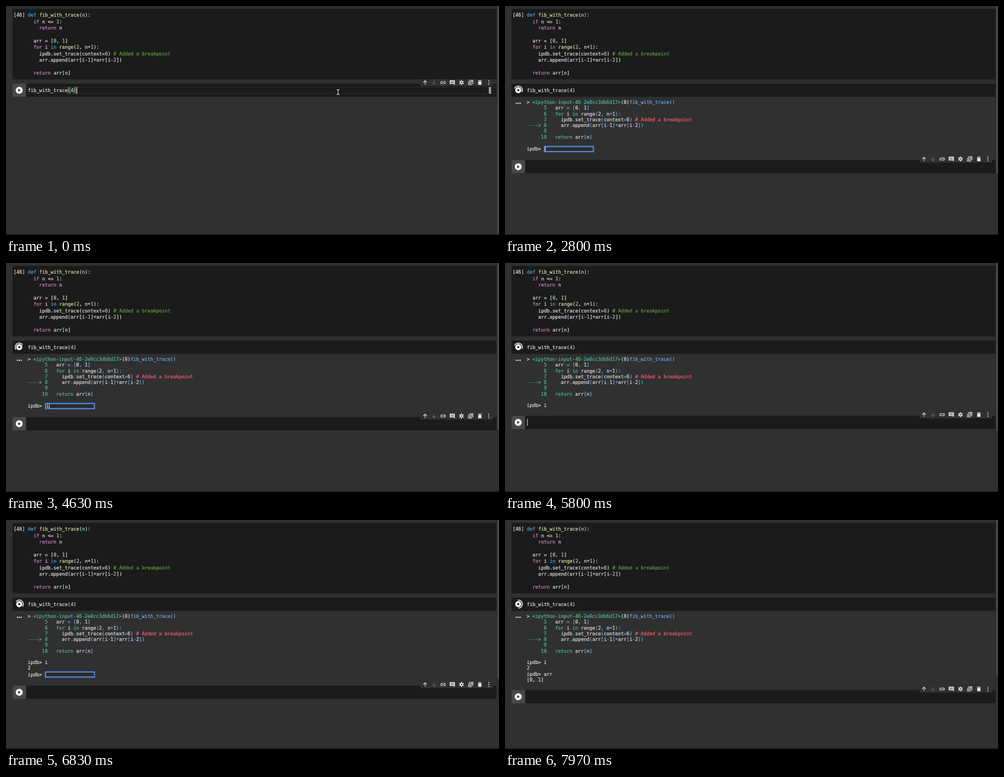
An HTML page with a canvas that plays this animation: 873 px wide and 407 px high, repeating every 8 s.

```html
<!DOCTYPE html>
<html lang="en">
<head>
<meta charset="utf-8">
<title>Notebook debugging</title>
<style>
  html, body { margin: 0; width: 100%; height: 100%; overflow: hidden; background: #303030; }
  canvas { display: block; }
</style>
</head>
<body>
<canvas id="stage" width="873" height="407"></canvas>
<script>
const ctx = document.getElementById('stage').getContext('2d');
const LOOP = 8000, CHAR = 5.055, LEFT = 38.7, ROW = 10.25;
const BG = '#303030', CELL = '#1b1b1b', WHITE = '#e8e8e8';
const RUN = 2400, OUTPUT = 2570;

const COLORS = {
  w: '#dcdcdc', b: '#569cd6', y: '#dcdcaa', l: '#9cdcfe', p: '#c586c0',
  n: '#b5cea8', c: '#5c9c40', g: '#4fb98a', o: '#6ea8e6', r: '#f4596e'
};

// "~k" switches to the colour stored under k
const CODE = [
  '~bdef ~yfib_with_trace~w(~ln~w):',
  '~p  if~w n <= ~n1~w:',
  '~p    return~w n',
  '',
  '  arr = [~n0~w, ~n1~w]',
  '~p  for~w i ~bin ~yrange~w(~n2~w, n+~n1~w):',
  '    ipdb.set_trace(context=~n6~w) ~c# Added a breakpoint',
  '    arr.append(arr[i-~n1~w]+arr[i-~n2~w])',
  '',
  '~p  return~w arr[n]'
];
const TRACE = [
  '> ~g<ipython-input-46-2e8cc3db6d17>~w(8)~ofib_with_trace()',
  '~g      5 ~w  arr ~o= [~w0~o,~w 1~o]',
  '~g      6   for~w i ~gin~w range~o(~w2~o,~w n~o+~w1~o):',
  '~g      7 ~w    ipdb~o.~wset_trace~o(~wcontext~o=~w6~o) ~r# Added a breakpoint',
  '~g----> 8 ~w    arr~o.~wappend~o(~warr~o[~wi~o-~w1~o]+~warr~o[~wi~o-~w2~o])',
  '~g      9 ',
  '~g     10   return~w arr~o[~wn~o]'
];
const PROMPTS = [
  { start: OUTPUT, text: 'i', keys: [4570], enter: 5430, reply: '2', answer: 5900 },
  { start: 6200, text: 'arr', keys: [6930, 7050, 7170], enter: 7350, reply: '[0, 1]', answer: 7770 }
];
const THUMB = [[0, 407], [RUN, 383], [2700, 297], [5430, 299], [5900, 290], [6200, 282], [7350, 284], [7770, 277]];

const ICONS = [
  { x: 742, line: 'M4 12L12 4L20 12M12 4V21' },
  { x: 758, line: 'M4 12L12 20L20 12M12 20V3', color: '#686868' },
  { x: 774, line: 'M10.5 7H7a5 5 0 0 0 0 10h3.5M13.5 7H17a5 5 0 0 1 0 10h-3.5M8 12h8' },
  { x: 790.3, fill: 'M1 2H23V23L18 18H1z', cut: 'M5 7H19M5 10.5H19M5 14H19' },
  { x: 806.5, line: 'M12 7a5 5 0 1 0 .01 0M12 1.5V6M12 18V22.5M2.9 6.7L7 9M17 15L21.1 17.3M2.9 17.3L7 15M17 9L21.1 6.7', width: 4 },
  { x: 822.7, line: 'M8 2H22V16H8zM3 7V21H17M12 12L18 6M13 6H18V11' },
  { x: 839, fill: 'M5 7H19V22H5zM4 3H8L9 2H15L16 3H20V5H4z' },
  { x: 855, fill: 'M10 2h4v4h-4zM10 10h4v4h-4zM10 18h4v4h-4z' }
];

const blink = elapsed => elapsed >= 0 && elapsed % 1000 < 500;

function rect(x, y, w, h, color) {
  ctx.fillStyle = color;
  ctx.fillRect(x, y, w, h);
}

function outline(x, y, w, h, color, width) {
  ctx.strokeStyle = color;
  ctx.lineWidth = width;
  ctx.strokeRect(x, y, w, h);
}

function disc(x, y, r, color) {
  ctx.fillStyle = color;
  ctx.beginPath();
  ctx.arc(x, y, r, 0, 7);
  ctx.fill();
}

function text(markup, x, y) {
  ctx.font = '8.4px "DejaVu Sans Mono", monospace';
  ctx.lineWidth = 0.22;
  const parts = ('~w' + markup).split(/~(\w)/);
  for (let i = 1; i < parts.length; i += 2) {
    ctx.fillStyle = ctx.strokeStyle = COLORS[parts[i]];
    ctx.fillText(parts[i + 1], x, y + 3);
    ctx.strokeText(parts[i + 1], x, y + 3);
    x += parts[i + 1].length * CHAR;
  }
}

function toolbar(y) {
  rect(734, y - 6, 128.5, 12.5, BG);
  for (const { x, line, fill, cut, color = WHITE, width = 2.6 } of ICONS) {
    ctx.save();
    ctx.translate(x - 4.9, y - 4.9);
    ctx.scale(0.41, 0.41);
    ctx.lineWidth = width;
    ctx.strokeStyle = ctx.fillStyle = color;
    if (line) ctx.stroke(new Path2D(line));
    if (fill) ctx.fill(new Path2D(fill));
    if (cut) {
      ctx.strokeStyle = BG;
      ctx.lineWidth = 1.6;
      ctx.stroke(new Path2D(cut));
    }
    ctx.restore();
  }
}

function cell(top, height) {
  rect(11.5, top, 857, height, CELL);
}

function activeCell(top) {
  cell(top, 23.5);
  rect(11.5, top, 24, 23.5, '#494949');
  const y = top + 11.8;
  disc(23.4, y, 6.2, '#f4f4f4');
  ctx.fillStyle = '#303030';
  ctx.fill(new Path2D(`M21.7 ${y - 2.7}V${y + 2.7}L26 ${y}z`));
}

function spinner(t) {
  const x = 23.5, y = 149.5, middle = ((t - 2800) / 1000) * 2 * Math.PI - 1.13;
  disc(x, y, 5.4, '#f4f4f4');
  rect(x - 1.6, y - 1.6, 3.2, 3.2, '#202020');
  ctx.strokeStyle = '#f0f0f0';
  ctx.lineWidth = 1.5;
  ctx.beginPath();
  ctx.arc(x, y, 7.3, middle - 1.6, middle + 1.6);
  ctx.stroke();
}

function mouse(x, y) {
  ctx.strokeStyle = '#e0e0e0';
  ctx.lineWidth = 1.2;
  ctx.stroke(new Path2D(`M${x - 2.5} ${y - 4.5}Q${x} ${y - 4.5} ${x} ${y - 3}Q${x} ${y - 4.5} ${x + 2.5} ${y - 4.5}` +
    `M${x} ${y - 3}V${y + 3}M${x - 2.5} ${y + 4.5}Q${x} ${y + 4.5} ${x} ${y + 3}Q${x} ${y + 4.5} ${x + 2.5} ${y + 4.5}`));
}

function editing(t) {
  activeCell(138);
  outline(36, 144.5, 832, 11, '#292929', 1);
  for (const column of [14, 16]) {
    const x = LEFT + column * CHAR;
    rect(x, 144.5, CHAR, 11, '#1d3524');
    outline(x + 0.3, 144.8, CHAR - 0.6, 10.4, '#858585', 0.7);
  }
  text('fib_with_trace(~n4~w)', LEFT, 149.5);
  rect(855, 144, 4, 12, '#a0a0a0');
  if (blink(t + 130)) rect(125, 144, 1, 12, '#e0e0e0');
  if (t < 100) mouse(588, 153);
  toolbar(136);
}

function inputBox(prompt, y, t) {
  const typed = prompt.keys.filter(key => t >= key);
  const value = prompt.text.slice(0, typed.length);
  rect(69, y - 5.5, 88.5, 11, '#2b2b2b');
  outline(69.5, y - 5, 87.5, 10, '#2f72d8', 1.8);
  outline(70.5, y - 4, 85.5, 8, '#b8cdec', 0.6);
  text(value, 71, y);
  if (blink(t - (typed.pop() ?? prompt.start)))
    rect(71.2 + value.length * CHAR, y - 4, 0.9, 8, '#e8e8e8');
}

// Draws the debugger session and returns the top of the cell below it
function session(t) {
  for (let i = 0; i < 3; i++) disc(20.2 + i * 3.3, 173, 1.15, WHITE);
  TRACE.forEach((line, i) => text(line, LEFT - 0.3, 171 + i * ROW));
  let y = 253, bottom = 0;
  for (const prompt of PROMPTS) {
    if (t < prompt.start) break;
    const open = t < prompt.enter;
    text('ipdb> ' + (open ? '' : prompt.text), LEFT - 0.3, y + (open ? 1 : 0));
    if (open) inputBox(prompt, y + 1.2, t);
    bottom = y + 18.5 + (open ? 2.4 : 0);
    y += ROW;
    if (t >= prompt.answer) {
      text(prompt.reply, LEFT - 0.3, y);
      bottom = y + 18.5;
      y += ROW;
    }
  }
  return bottom;
}

function running(t) {
  cell(138, 23.5);
  spinner(t);
  text('fib_with_trace(~n4~w)', LEFT, 149.5);
  const top = t < OUTPUT ? 168.5 : session(t);
  activeCell(top);
  toolbar(top - 2);
  const [first, second] = PROMPTS;
  const focused = t < OUTPUT ? RUN
    : t >= second.enter ? second.enter
    : t >= first.enter && t < second.start ? first.enter : Infinity;
  if (blink(t - focused)) rect(39.2, top + 5.7, 1, 12, '#e0e0e0');
}

function draw(t) {
  rect(0, 0, 873, 407, BG);
  cell(5, 125.5);
  text('[46]', 13.5, 16.2);
  CODE.forEach((line, i) => text(line, LEFT, 16.2 + i * 11.42));
  if (t < RUN) editing(t); else running(t);
  const [, height] = THUMB.findLast(([start]) => t >= start);
  rect(870, 0, 3, height, '#484848');
  rect(0, 405.5, 873, 1.5, '#1f1f1f');
}

function tick() {
  draw(performance.now() % LOOP);
  requestAnimationFrame(tick);
}
tick();
</script>
</body>
</html>
```
